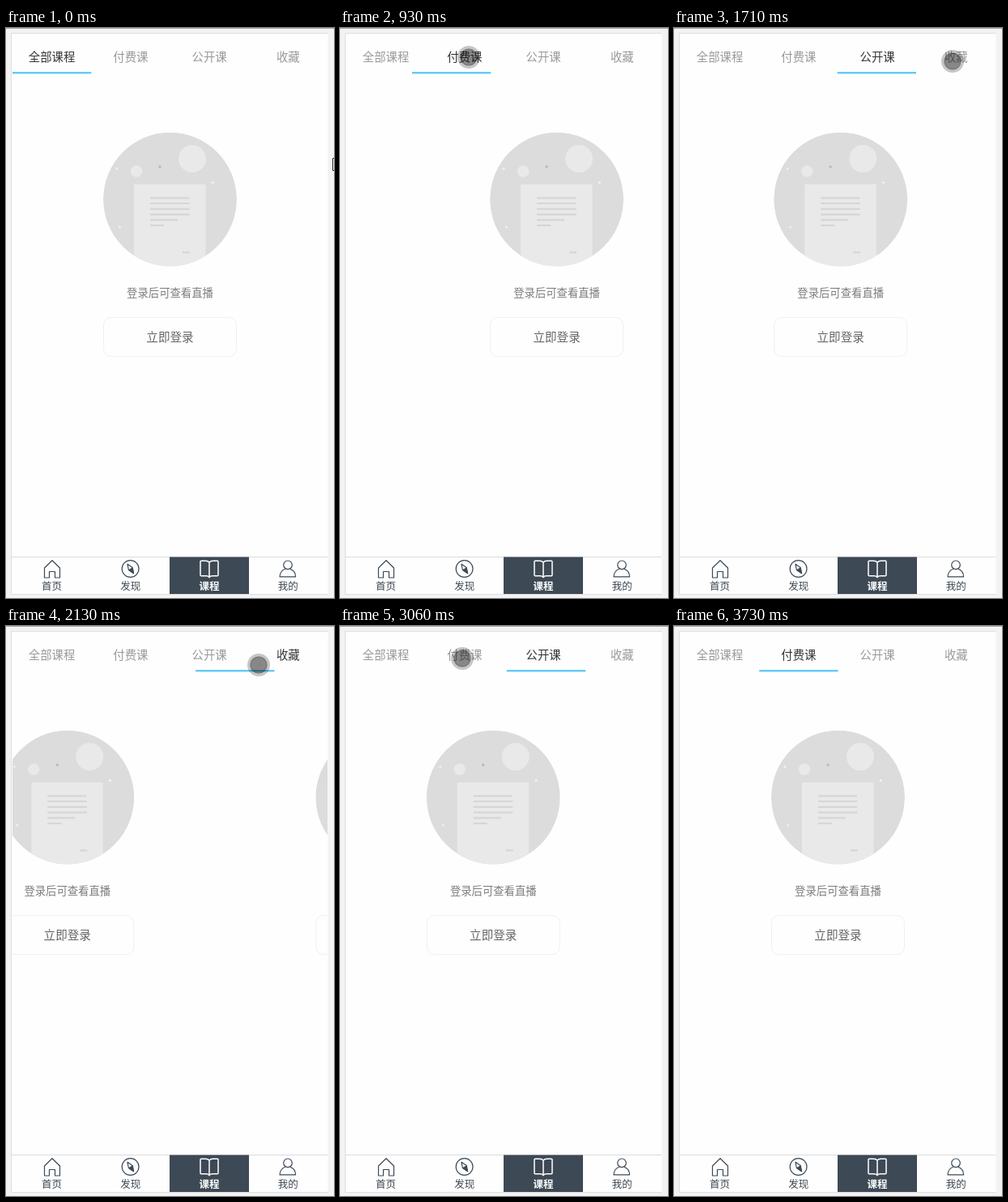
Recreate the animation shown at these times as an HTML page. Size 405 by 702 pixels, loop 4570 ms.

```html
<!DOCTYPE html>
<html lang="zh-CN">
<head>
<meta charset="utf-8">
<title>课程</title>
<style>
  html, body { margin: 0; width: 100%; height: 100%; overflow: hidden; background: #f3f3f3; }
  svg { display: block; width: 100%; height: 100%; }
  text { font-family: "Noto Sans CJK SC", "Noto Sans CJK", sans-serif; text-anchor: middle; }
  .tab { font-size: 14.4px; fill: #999; }
  .tab.on { fill: #333; }
  .nav { font-size: 12.5px; fill: #3d4955; }
  .nav.on { fill: #fff; font-weight: 700; }
  .icon { fill: none; stroke: #3d4955; stroke-width: 1.2; stroke-linejoin: round; }
</style>
</head>
<body>
<svg viewBox="0 0 405 702">
  <defs>
    <clipPath id="panel"><rect x="8" y="58" width="389" height="593"/></clipPath>
    <clipPath id="disc"><circle cx="202.5" cy="211" r="82.5"/></clipPath>
    <radialGradient id="core">
      <stop offset="0" stop-opacity=".33"/>
      <stop offset=".75" stop-opacity=".31"/>
      <stop offset="1" stop-opacity=".42"/>
    </radialGradient>
    <g id="page">
      <g clip-path="url(#disc)">
        <circle cx="202.5" cy="211" r="82.5" fill="#dcdcdc"/>
        <g fill="#e9e9e9">
          <circle cx="230" cy="161" r="17"/>
          <circle cx="161" cy="176.5" r="7.2"/>
          <rect x="158" y="192.5" width="88.5" height="110"/>
        </g>
        <g fill="#f2f2f2">
          <circle cx="137" cy="173.3" r="1.4"/>
          <circle cx="255.3" cy="190.3" r="1.5"/>
          <circle cx="140.5" cy="245.3" r="1.4"/>
        </g>
        <circle cx="190" cy="171" r="1.7" fill="#bababa"/>
        <path d="M178 209.3h48M178 216h48.5M178 222.8h48.5M178 229.6h48.5M178 236.4h34M178 243.2h17M218 276.3h9"
          stroke="#d6d6d6" stroke-width="2.2"/>
      </g>
      <text x="202.5" y="331.4" font-size="13.35" fill="#7c7c7c">登录后可查看直播</text>
      <rect x="120.5" y="356.5" width="164" height="48" rx="9" fill="#fefefe" stroke="#f0f0f0"/>
      <text x="202.5" y="386" font-size="14.6" fill="#666">立即登录</text>
    </g>
  </defs>

  <rect width="405" height="702" fill="#f3f3f3"/>
  <path d="M0 .5h405" stroke="#a9a9a9"/>
  <rect x="7" y="7" width="390.5" height="690" fill="#fefefe"/>
  <path d="M397.5 6.5h-391v691h391" fill="none" stroke="#dedede"/>

  <g clip-path="url(#panel)"><g id="pages"></g></g>
  <g id="tabs"></g>
  <rect id="bar" y="54" width="97.3" height="2.4" fill="#63caf5"/>

  <path d="M7 651.5h390" stroke="#dcdcdc"/>
  <rect x="202" y="651.5" width="98" height="45.5" fill="#3d4955"/>
  <g class="icon">
    <path d="M47.5 677v-12l9.5-9.3 9.5 9.3v12h-6v-7.5h-7v7.5z"/>
    <circle cx="153.6" cy="666" r="10.4"/>
    <path d="M150 660.3l6.2 4.2 1.4 7.2-6.2-4.2z"/>
    <path d="M151.4 667.5l4.8-3 1.4 7.2z" fill="#3d4955" stroke-width=".6"/>
    <circle cx="348" cy="661.3" r="5.3"/>
    <path d="M344.8 666.2c-4 1.4-6.6 4.8-6.8 9.6h19.6c-.2-4.8-2.8-8.2-6.6-9.6"/>
    <path d="M251 658.2c-1-1.5-2.4-2-4.4-2h-5.6q-1 0-1 1v16.6q0 1 1 1h6c2 0 3.2.5 4 1.8.8-1.3 2-1.8 4-1.8h6q1 0 1-1v-16.6q0-1-1-1h-5.6c-2 0-3.4.5-4.4 2v17"
      stroke="#fff" stroke-width="1.5"/>
  </g>
  <g id="navs"></g>

  <path id="edge" d="M406 160.5h-2.5v15h2.5" fill="#fff" stroke="#222"/>
  <g id="touch">
    <circle r="14" fill-opacity=".22"/>
    <circle r="10.6" fill="url(#core)"/>
  </g>
</svg>
<script>
const LOOP = 4570, PAGE = 389, TAB = 97.25, LEFT = 8;

// Page changes: start, duration, target tab
const moves = [
  [765, 310, 1], [1446, 300, 2], [2066, 300, 3], [2830, 300, 2], [3297, 275, 1]
];

// Screen refreshes with the touch point: time, x, y
const ticks = [
  [0], [120, 377, 148], [270, 330, 126], [390, 240, 86], [510, 145, 43],
  [660, 159, 36], [780, 159, 36], [930, 159, 36], [1050, 165, 38],
  [1200, 205, 40], [1320, 248, 38], [1560, 250, 38], [1710, 344, 41],
  [1830, 352, 39], [1980, 354, 36], [2130, 312, 48], [2250, 260, 44],
  [2400, 218, 36], [2520, 206, 34], [2670, 221, 41], [2910, 186, 41],
  [3060, 151, 40], [3190, 151, 40], [3340, 165, 53], [3490, 235, 260],
  [3610, 311, 654], [3730]
];

const $ = id => document.getElementById(id);
const tabX = i => LEFT + TAB * (i + .5);

function labels(names, cls, y) {
  return names.map((s, i) => `<text class="${cls}" x="${tabX(i)}" y="${y}">${s}</text>`).join('');
}

$('tabs').innerHTML = labels(['全部课程', '付费课', '公开课', '收藏'], 'tab', 41.2);
$('navs').innerHTML = labels(['首页', '发现', '课程', '我的'], 'nav', 692);
$('navs').children[2].classList.add('on');
$('pages').innerHTML = [0, 1, 2, 3].map(i => `<use href="#page" x="${i * PAGE}"/>`).join('');

// CSS "ease": cubic-bezier(.25, .1, .25, 1)
function ease(x) {
  if (x <= 0) return 0;
  if (x >= 1) return 1;
  const curve = (s, a, b) => 3 * (1 - s) ** 2 * s * a + 3 * (1 - s) * s * s * b + s ** 3;
  let lo = 0, hi = 1;
  for (let i = 0; i < 24; i++) {
    const mid = (lo + hi) / 2;
    if (curve(mid, .25, .25) < x) lo = mid; else hi = mid;
  }
  return curve(lo, .1, 1);
}

function draw(now) {
  const time = now % LOOP;
  const [t, x, y] = ticks.findLast(k => k[0] <= time);

  let pos = 0, active = 0;
  for (const [start, length, to] of moves) {
    if (t < start) break;
    pos += (to - pos) * ease((t - start) / length);
    active = to;
  }

  $('pages').setAttribute('transform', `translate(${-pos * PAGE})`);
  $('bar').setAttribute('x', LEFT + pos * TAB);
  [...$('tabs').children].forEach((el, i) => el.classList.toggle('on', i === active));

  $('edge').style.display = t === 0 ? '' : 'none';
  $('touch').style.display = x ? '' : 'none';
  if (x) $('touch').setAttribute('transform', `translate(${x} ${y})`);
}

const begin = performance.now();
function frame() {
  draw(performance.now() - begin);
  requestAnimationFrame(frame);
}
frame();
</script>
</body>
</html>
```
